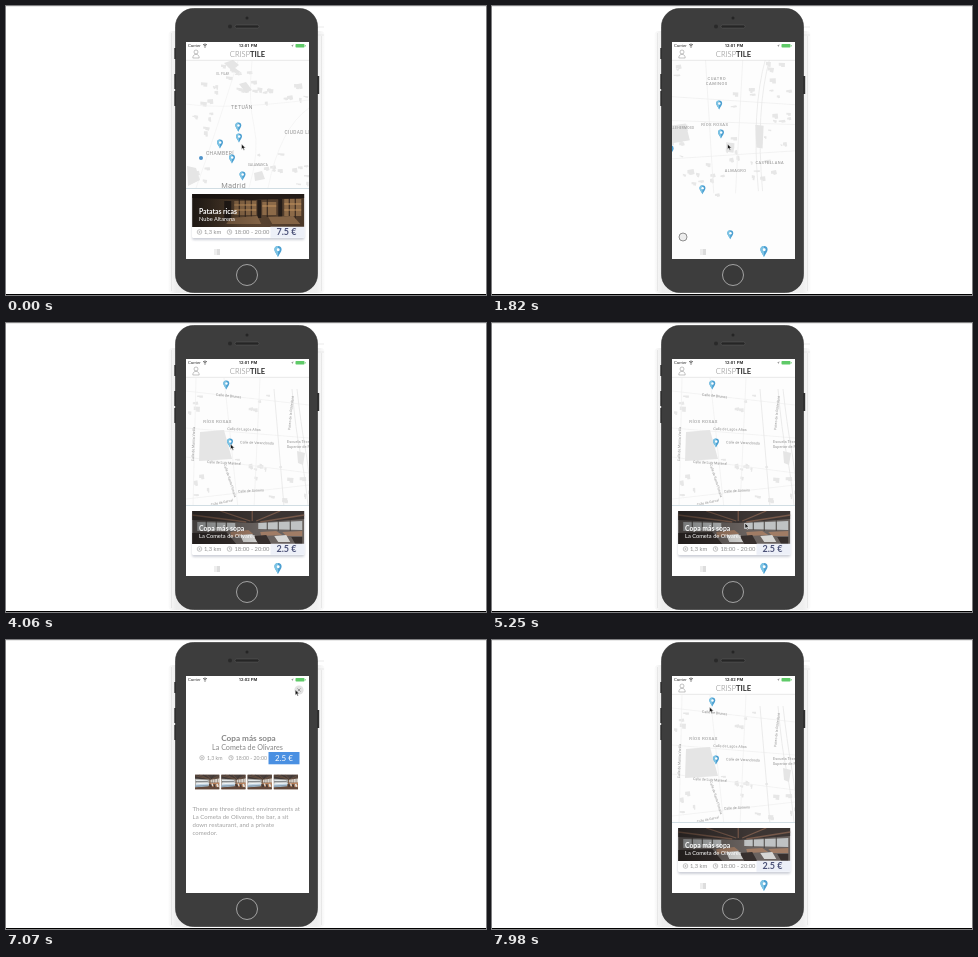
These frames come from a looping animation (480 by 289 pixels, 8 s). An HTML page:

```html
<!DOCTYPE html>
<html lang="en">
<head>
<meta charset="utf-8">
<title>Map app demo</title>
<style>
html, body { margin: 0; width: 100%; height: 100%; overflow: hidden; background: #fff; }
svg.stage { display: block; width: 100vw; height: 100vh; }
text { font-family: Lato, "Open Sans", sans-serif; }
.map text { font-family: Roboto, "Noto Sans", sans-serif; text-anchor: middle; fill: #8f8f8f; }
.sys text { font-family: Roboto, sans-serif; font-size: 4.3px; fill: #333; }
.mid { text-anchor: middle; }
.line { fill: none; stroke: #9a9a9a; stroke-width: .6; }
</style>
</head>
<body>
<svg class="stage" viewBox="0 0 480 289" preserveAspectRatio="none">
  <defs>
    <clipPath id="screen"><path d="M180 36h123v217H180z"/></clipPath>
    <clipPath id="heroClip"><rect id="heroRect" x="180" y="36" width="123" height="72"/></clipPath>
    <linearGradient id="halo">
      <stop offset="0" stop-color="#fafafa"/><stop offset=".05" stop-color="#e6e6e6"/>
      <stop offset=".95" stop-color="#e9e9e9"/><stop offset="1" stop-color="#fafafa"/>
    </linearGradient>
    <linearGradient id="warm">
      <stop offset="0" stop-color="#302720"/><stop offset=".45" stop-color="#5d4631"/>
      <stop offset="1" stop-color="#4b3829"/>
    </linearGradient>
    <linearGradient id="shade">
      <stop offset="0" stop-color="#000" stop-opacity=".4"/><stop offset="1" stop-color="#000" stop-opacity="0"/>
    </linearGradient>
    <filter id="soft" x="-20%" y="-20%" width="140%" height="140%"><feGaussianBlur stdDeviation="1.2"/></filter>
    <filter id="tiny"><feGaussianBlur stdDeviation=".35"/></filter>

    <symbol id="bar" viewBox="0 0 123 72">
      <path fill="#7d604b" d="M0 0h123v72H0z"/>
      <path fill="#493f3b" d="M0 0h123v17L78 25 0 22z"/>
      <path stroke="#8d6549" stroke-width="2" d="M0 4l70 18M20 0l56 22M58 0l22 22M123 2L82 23M123 12L84 24"/>
      <path stroke="#2b2726" stroke-width="1.4" d="M0 11l66 12M40 0l36 22M95 0L80 22"/>
      <path fill="#a9a9a7" d="M0 20l72 4v16L0 44z"/>
      <path fill="#e3e8ea" d="M4 25l60 2v4L4 31zM8 34l55-1v4L8 39z"/>
      <path fill="#4d5259" d="M4 31h60v2L4 34z"/>
      <path fill="#c3d4e2" d="M3 44l62-4 7 3-6 16L0 63z"/>
      <path fill="#f0f4f6" d="M3 42l64-3 5 4-69 4z"/>
      <path fill="#8ca3b6" d="M0 54l68-4-2 7-66 5z"/>
      <path fill="#d8d2ca" d="M78 25l45-7v22l-45-1z"/>
      <path stroke="#5a4a42" stroke-width="2" d="M87 23v18M99 21v21M113 18v26"/>
      <path fill="#b9815b" d="M74 42l49-4v8l-43 3zM84 53l39-4v9l-36 3z"/>
      <path fill="#493b36" d="M70 46l12 2 3 15-12-2zM92 49l9-1 3 16-9 2z"/>
      <path fill="#dfdcd7" d="M82 44l7-1 3 12-6 2zM106 46l9-1 5 15-9 1z"/>
      <path fill="#62473a" d="M0 63l65-4 58 4v9H0z"/>
    </symbol>
    <symbol id="photo1" viewBox="0 0 112 33">
      <path fill="url(#warm)" d="M0 0h112v33H0z"/>
      <g filter="url(#tiny)">
        <path fill="#8c6a48" d="M42 7h22v14H42zM70 8h14v13H70zM92 5h17v17H92z"/>
        <path stroke="#2d211a" d="M47 5v18M53 5v18M59 5v18M75 5v18M97 3v22M103 3v22"/>
        <path stroke="#c99860" stroke-width=".9" d="M42 11h22M42 16h22M70 12h14M92 10h17M92 16h17"/>
        <path fill="#241c18" d="M0 0h112v4L60 6 0 4zM32 7h7v19h-7zM65 6h4v18h-4zM86 4h4v21h-4z"/>
        <path fill="#846446" d="M38 24l27-2 4 8H34zM76 23l25-1 7 8H80z"/>
      </g>
      <path fill="url(#shade)" d="M0 0h70v33H0z"/>
    </symbol>
    <symbol id="photo2" viewBox="0 0 112 33">
      <path fill="#6a6360" d="M0 0h112v33H0z"/>
      <path fill="#3c3533" d="M0 0h112v8L60 12 0 9z"/>
      <path stroke="#76594a" stroke-width="1.3" d="M0 4l54 7M28 0l30 10M60 0v10M88 0L64 10M112 4L68 11"/>
      <path fill="#bfc2c3" d="M5 11l38 1v7L5 20zM66 12l44-2v9l-44-1z"/>
      <path stroke="#4a4543" d="M14 10v10M24 10v10M34 11v9M75 11v8M86 10v10M98 9v11"/>
      <path fill="#a07c65" d="M38 21l18-2 5 4-22 3zM68 21l16-1 6 4-21 1zM90 21l20-1v5H94z"/>
      <path fill="#d6d6d4" d="M48 24l12-1 5 8H51zM82 25l12-1 4 7H86z"/>
      <path fill="#37302e" d="M0 22l34-1 10 12H0zM62 25l12-1 5 9H66zM99 26h11v7h-7z"/>
      <path fill="url(#shade)" d="M0 0h70v33H0z"/>
    </symbol>
    <g id="pin">
      <path fill="#4b9fd1" d="M0 4.6C-1 2.2-3 .2-3-1.5a3 3 0 0 1 6 0C3 .2 1 2.2 0 4.6z"/>
      <path fill="#7cc3e4" d="M0 4.6C-1 2.2-3 .2-3-1.5a3 3 0 0 1 3-3z"/>
      <circle cx=".2" cy="-1.5" r="1.2" fill="#fff"/>
    </g>
    <g id="facts">
      <g class="line">
        <circle cx="193.500" cy="226" r="2.300"/><circle cx="193.500" cy="226" r=".6"/>
        <circle cx="223.500" cy="226" r="2.300"/><path d="M223.500 224.500v1.700h1.200"/>
      </g>
      <g fill="#8d8d8d" font-size="5.800"><text x="198" y="228">1,3 km</text><text x="228.500" y="228">18:00 - 20:00</text></g>
    </g>
  </defs>

  <path fill="#fff" d="M0 0h480v289H0z"/>
  <path fill="#d4d4d4" d="M0 0h480v.6H0z"/>
  <rect x="162.500" y="25" width="156" height="262" rx="4" fill="url(#halo)" opacity=".75"/>
  <path fill="none" stroke="#ddd" stroke-width=".6" d="M304 21h14M304 29h14M165.500 27v258M315.500 30v255"/>
  <path fill="#303030" d="M168.300 42h2v11h-2zM168.300 68h2v15h-2zM168.300 85h2v15h-2zM311 70h2.200v18H311z"/>
  <rect x="169.500" y="2.500" width="142" height="284" rx="18" fill="#3d3d3d" stroke="#2d2d2d" stroke-width=".6"/>
  <circle cx="241" cy="12" r="1.500" fill="#252525"/>
  <circle cx="224" cy="20.500" r="2" fill="#292929"/>
  <rect x="229" y="19" width="24" height="3" rx="1.500" fill="#252525" stroke="#666" stroke-width=".4"/>
  <circle cx="241" cy="269" r="10.500" fill="#393939" stroke="#bdbdbd" stroke-width=".8"/>

  <g clip-path="url(#screen)">
    <path fill="#fdfdfd" d="M180 36h123v217H180z"/>
    <g id="map" class="map"></g>
    <g id="pins"></g>
    <circle cx="191" cy="231" r="4" fill="#ededed" stroke="#666" stroke-width=".7"/>

    <g id="panel">
      <path fill="#fff" d="M180 182h123v72H180z"/>
      <path stroke="#c6d5dc" stroke-width=".8" d="M180 182.500h123"/>
      <rect x="186" y="190" width="112.500" height="44" rx="2" fill="#b4b8c4" opacity=".65" filter="url(#soft)"/>
      <rect x="186" y="188" width="112.500" height="44" rx="1.500" fill="#fff"/>
      <use id="photoA" href="#photo1" x="186" y="188" width="112.500" height="33"/>
      <use id="photoB" href="#photo2" x="186" y="188" width="112.500" height="33"/>
      <text id="dish" x="193" y="207.600" font-size="6.800" font-weight="700" fill="#fff"></text>
      <text id="place" x="193" y="214.800" font-size="5.700" fill="#fff"></text>
      <use href="#facts"/>
      <path fill="#edf0f8" d="M264.500 220.800h34v11h-34z"/>
      <text id="price" class="mid" x="280.500" y="229.400" font-size="9" font-weight="700" fill="#4c5278"></text>
    </g>
    <path stroke="#aaa" stroke-width=".8" d="M208.500 244h1M210.500 244h3.500M208.500 246h1M210.500 246h3.500M208.500 248h1M210.500 248h3.500"/>
    <use href="#pin" transform="translate(272 245.500) scale(1.200)"/>

    <path fill="#fff" d="M180 36h123v18H180z"/>
    <path stroke="#d9d9d9" stroke-width=".6" d="M180 54.300h123"/>
    <g class="line" stroke-width=".8"><circle cx="190" cy="46" r="2"/><path d="M186.800 52c0-5 6.400-5 6.400 0z"/></g>
    <text class="mid" x="241.500" y="51.200" font-size="7.600" fill="#777"><tspan font-weight="300">CRISP</tspan><tspan font-weight="700" fill="#333">TILE</tspan></text>

    <g id="detail">
      <path id="page" fill="#fff" d="M180 36h123v217H180z"/>
    </g>
    <g class="sys">
      <text x="182" y="41.400">Carrier</text>
      <path d="M197 38.800q2-1.600 4 0M197.900 39.900q1.100-.8 2.200 0" fill="none" stroke="#333" stroke-width=".7"/>
      <circle cx="199" cy="41" r=".5"/>
      <text id="clock" class="mid" x="242" y="41.400" font-weight="700"></text>
    </g>
    <g id="hero">
      <use id="heroPic" href="#bar" x="180" y="36" width="123" height="72" preserveAspectRatio="none" clip-path="url(#heroClip)"/>
      <g id="heroNav">
        <text class="mid" x="241.500" y="54" font-size="7.600" fill="#fff"><tspan font-weight="300">CRISP</tspan><tspan font-weight="700">TILE</tspan></text>
        <circle cx="293" cy="50" r="4.600" fill="#d8d8d8" opacity=".75"/>
        <path stroke="#777" stroke-width=".7" d="M291.500 48.500l3 3M294.500 48.500l-3 3"/>
      </g>
    </g>
    <g id="sheet">
      <path fill="#fff" d="M180 107.500h9.500V87h104v20.500h9.500V253H180z"/>
      <text class="mid" x="242.500" y="100.800" font-size="8.200" font-weight="700" fill="#858585">Copa más sopa</text>
      <text class="mid" x="241.500" y="110" font-size="7.200" fill="#858585">La Cometa de Olivares</text>
      <g class="line">
        <circle cx="196" cy="117.800" r="2.200"/><circle cx="196" cy="117.800" r=".6"/>
        <circle cx="225" cy="117.800" r="2.200"/><path d="M225 116.400v1.600h1.200"/>
      </g>
      <g fill="#999" font-size="5.200"><text x="201" y="119.700">1,3 km</text><text x="229.700" y="119.700">18:00 - 20:00</text></g>
      <path fill="#4a90e2" d="M262.500 112h31v12.300h-31z"/>
      <text class="mid" x="278" y="120.900" font-size="8" fill="#fff">2.5 €</text>
      <g id="thumbs"></g>
      <g fill="#a0a0a0" font-size="6" letter-spacing=".05">
        <text x="186.500" y="170.700">There are three distinct environments at</text>
        <text x="186.500" y="178.800">La Cometa de Olivares, the bar, a sit</text>
        <text x="186.500" y="186.900">down restaurant, and a private</text>
        <text x="186.500" y="195">comedor.</text>
      </g>
    </g>
    <path fill="#999" d="M285 39.800l2.600-1.500-1 2.900-.4-1.200z"/>
    <rect x="289.500" y="38" width="9" height="3.400" rx=".7" fill="#5fca68"/>
    <path fill="#8ad38f" d="M299 39h.8v1.400h-.8z"/>
  </g>

  <path id="cursor" d="M0 0V5.400L1.300 4.200 2.200 6.300 3.200 5.900 2.300 3.900H4z" fill="#111" stroke="#fff" stroke-width=".5"/>
  <path fill="#000" d="M0 288h480v1H0z"/>
</svg>

<script>
const LOOP = 8000, STEP = 70;
const $ = id => document.getElementById(id);

function add(parent, tag, attrs, text) {
  const el = document.createElementNS("http://www.w3.org/2000/svg", tag);
  for (const k in attrs) el.setAttribute(k, attrs[k]);
  if (text) el.textContent = text;
  parent.append(el);
  return el;
}

function rng(seed) {
  return () => (seed = (seed * 16807) % 2147483647) / 2147483647;
}

// Small tilted buildings gathered around each centre.
function scatter(g, seed, centres, n, spread, size) {
  const rnd = rng(seed);
  let d = "";
  for (const [cx, cy] of centres) for (let i = 0; i < n; i++) {
    const x = cx + (rnd() - .5) * spread, y = cy + (rnd() - .5) * spread;
    const w = size * (.4 + rnd()), h = size * (.3 + rnd() * .8), k = (rnd() - .5) * 2;
    d += `M${x} ${y}l${w} ${k}l${-k} ${h}l${-w * .6} ${-k}l${k} ${-h * .3}l${-w * .4} 0z`;
  }
  add(g, "path", { d, fill: "#e7e7e7" });
}

const label = (g, x, y, text, size = 3.6, turn = 0, gap = 0) =>
  add(g, "text", { x, y, "font-size": size, "letter-spacing": gap, transform: `rotate(${turn} ${x} ${y})` }, text);
const roads = (g, d, width = 1, stroke = "#e6e6e6") =>
  add(g, "path", { d, fill: "none", stroke, "stroke-width": width });
const area = (g, d) => add(g, "path", { d, fill: "#e5e5e5" });

const layers = [
  { scale: 1, x: 233, y: 132 },
  { scale: 2.55, x: 229, y: 128 },
  { scale: 5.3, x: 224, y: 120 },
  { scale: 5.3, x: 224, y: 120 }
];
for (const l of layers) l.g = add($("map"), "g", {});
const [city, zone, district, streets] = layers.map(l => l.g);

scatter(city, 71, [[226, 62], [238, 74], [287, 83], [196, 115], [188, 166], [262, 153], [291, 168], [252, 88], [205, 86]], 6, 22, 5);
roads(city, "M246 55q-4 40 2 65t-5 62M180 98q40 6 123-4M190 182q18-50 42-127M262 182q12-60 41-80", .6, "#f0f0f0");
area(city, "M218 57l9-3 6 5-4 3 7 5-8-1-5-4zM233 78l7-2 6 8-6 3zM181 160l9 2 4 12-12 6zM248 167l8-2 3 8-10 2z");
label(city, 236, 102.5, "TETUÁN", 5, 0, .5);
label(city, 214, 148.700, "CHAMBERÍ", 5, 0, .4);
label(city, 298, 127.500, "CIUDAD LINEAL", 4.8, 0, .4);
label(city, 252, 160, "SALAMANCA", 3, 0, .2);
label(city, 217, 69, "EL PILAR", 2.8, 0, .2);
label(city, 227.500, 182, "Madrid", 7.5, 0, .2);

scatter(zone, 29, [[190, 66], [284, 64], [194, 130], [236, 138], [282, 124], [268, 158], [200, 160], [250, 92], [290, 100], [215, 172]], 6, 30, 4.5);
roads(zone, "M180 92l123 8M180 152l123-8M214 55l8 130M250 55l-7 130M180 115l123 4", .7, "#efefef");
roads(zone, "M272 55q-14 50-7 128M276 55q-14 50-7 128", .7);
area(zone, "M181 120l14-2 4 16-17 3zM262 119l8 1-1 22-6-1zM234 136l8 1-1 9-7-1z");
label(zone, 225, 75.800, "CUATRO", 4, 0, .5);
label(zone, 225, 80.600, "CAMINOS", 4, 0, .5);
label(zone, 223, 120, "RÍOS ROSAS", 4, 0, .4);
label(zone, 243, 164.500, "ALMAGRO", 3.8, 0, .4);
label(zone, 276, 156.500, "CASTELLANA", 3.8, 0, .4);
label(zone, 190, 123, "VALLEHERMOSO", 3.2, 0, .2);

scatter(district, 53, [[245, 150], [280, 205], [196, 172], [212, 196], [270, 65], [190, 78], [248, 84], [284, 152], [292, 226], [232, 226]], 4, 30, 6);
roads(district, "M180 66l123 14M180 96l110 12M180 142l123 11M180 176l123-10M217 55l10 198M243 55l-5 198M187 55l-2 198", .7, "#f0f0f0");
roads(district, "M272 55q7 40 14 62t17 63M279 55q3 38 11 60t13 42", .8);
roads(district, "M274 90l14 42 4-30M270 98l18-2M284 55l6 62", .6, "#dedede");
area(district, "M189 110l24-2 4 31h-28zM276 96l7-1 2 9-8 1z");
label(district, 221, 74, "Calle de Brunes", 3.5, 6);
label(district, 241, 91, "Calle de Ramiro Soto", 3.3, -84);
label(district, 252, 96, "Calle de Benito Lasierra", 3.3, -82);
label(district, 188, 142, "Calle de Mansa Varilla", 3.5, -89);
label(district, 258, 144, "Calle de Luis Maranal", 3.6, 4);
label(district, 226, 169, "Calle de Santa Floriana", 3.4, 72);
label(district, 211.500, 100, "RÍOS ROSAS", 4.4, 0, .4);
label(district, 255.500, 188, "ALMAGRO", 4.4, 0, .4);
label(district, 188, 206.700, "TRAFALGAR", 4.4, 0, .4);

scatter(streets, 97, [[194, 82], [252, 75], [262, 148], [292, 160], [198, 160], [272, 175], [240, 142]], 4, 24, 5);
roads(streets, "M180 68l123 14M180 105l123 10M180 134l123 16M180 176l123-14M218 55l14 130M254 55l-6 130M190 55l-3 130", .7, "#f0f0f0");
roads(streets, "M286 66q4 44 8 62t8 54M291 66q4 36 8 58t4 34M268 66l10 118", .8);
area(streets, "M194 109l24-2 8 29-33 2zM291 128l8 2-2 12-5-2z");
label(streets, 222.500, 74, "Calle de Brunes", 3.7, 6);
label(streets, 211.500, 100, "RÍOS ROSAS", 4.4, 0, .4);
label(streets, 238, 107.500, "Calle de Lagos Altos", 3.7, 2);
label(streets, 251, 121, "Calle de Verandonda", 3.7, 2);
label(streets, 218, 141, "Calle de Luis Maranal", 3.6, 3);
label(streets, 245, 169, "Calle de Solmiro", 3.6, -3);
label(streets, 216, 180.500, "Calle de Garcal", 3.4, -12);
label(streets, 188.500, 121, "Calle de Mansa Varilla", 3.5, -88);
label(streets, 223, 158, "Calle de Santa Floriana", 3.4, 72);
label(streets, 286, 90, "Paseo de la Robledana", 3.4, -84);
label(streets, 295, 119.500, "Escuela Técnica", 3.9);
label(streets, 297, 124.500, "Superior de Policía", 3.9);

// Offsets from the anchor pin at city scale.
const pins = [[3.5, 38], [-7, 21], [-19, 6], [-.7, -10.95], [0, 0]]
  .map(([x, y]) => ({ x, y, el: add($("pins"), "use", { href: "#pin" }) }));
const dot = { x: -38, y: 20, el: add($("pins"), "circle", { r: 2, fill: "#4f93c9" }) };

for (let i = 0; i < 4; i++) add($("thumbs"), "use", {
  href: "#bar", x: 189 + i * 26.2, y: 130, width: 24.5, height: 24, preserveAspectRatio: "none"
});

// Rows are [time, ...values].
const VIEW = [[70, 1, 233, 132], [840, 2.55, 229, 128], [910, 2.55, 229, 128], [1260, 2.65, 229, 128],
  [1820, 2.65, 229, 128], [2100, 5.3, 224, 120]];
const FADES = [
  [[420, 1], [770, 0]],
  [[350, 0], [700, 1], [1820, 1], [2100, 0]],
  [[1820, 0], [2030, 1], [2940, 1], [3150, 0]],
  [[2870, 0], [3080, 1]]
];
const HIDE = [[910, 0], [1260, 1], [3710, 1], [3920, 0]];
const CURSOR = [[2240, 235.5, 138], [2520, 228, 126], [2800, 224.5, 121], [4130, 224.5, 121],
  [4900, 253, 200], [5600, 253, 200], [5950, 262, 141], [6790, 291, 48], [6930, 291, 48],
  [7560, 277, 62], [7700, 277, 62], [7980, 217.5, 67]];

function at(rows, t) {
  const i = rows.findIndex(r => r[0] > t);
  if (i === 0) return rows[0].slice(1);
  if (i < 0) return rows[rows.length - 1].slice(1);
  const a = rows[i - 1], b = rows[i], p = (t - a[0]) / (b[0] - a[0]), e = p * p * (3 - 2 * p);
  return a.slice(1).map((v, k) => v + (b[k + 1] - v) * e);
}

const spring = (ms, w) => ms <= 0 ? 1 : (1 + w * ms / 1000) * Math.exp(-w * ms / 1000);
const move = (el, x, y) => el.setAttribute("transform", `translate(${x} ${y})`);
const show = (el, on) => el.setAttribute("visibility", on ? "visible" : "hidden");

function drawMap(t) {
  const [s, x, y] = at(VIEW, t);
  layers.forEach((l, i) => {
    const [o] = at(FADES[i], t);
    show(l.g, o > 0);
    l.g.setAttribute("opacity", o);
    l.g.setAttribute("transform", `translate(${x} ${y}) scale(${s / l.scale}) translate(${-l.x} ${-l.y})`);
  });
  for (const p of [...pins, dot]) move(p.el, x + p.x * s, y + p.y * s);
}

function drawCard(t) {
  const first = t < 2000;
  move($("panel"), 0, at(HIDE, t)[0] * 72);
  show($("photoA"), first);
  show($("photoB"), !first);
  $("dish").textContent = first ? "Patatas ricas" : "Copa más sopa";
  $("place").textContent = first ? "Nube Altarena" : "La Cometa de Olivares";
  $("price").textContent = first ? "7.5 €" : "2.5 €";
}

function drawDetail(t) {
  const on = t >= 5180 && t < 7630;
  for (const id of ["detail", "hero", "sheet"]) show($(id), on);
  if (!on) return;
  // 1 = resting in the card, 0 = fully open
  const r = t < 6500 ? spring(t - 5180, 14.6) : 1 - spring(t - 7070, 13);
  const box = { x: 180 + 6 * r, y: 36 + 152 * r, width: 123 - 10.5 * r, height: 72 - 39 * r };
  for (const k in box) {
    $("heroRect").setAttribute(k, box[k]);
    $("heroPic").setAttribute(k, box[k]);
  }
  move($("heroNav"), 0, box.y - 36);
  const o = Math.max(0, Math.min(1, 1.3 - 2 * r));
  $("page").setAttribute("opacity", o);
  $("sheet").setAttribute("opacity", o);
  $("heroNav").setAttribute("opacity", o);
  $("hero").setAttribute("opacity", Math.min(1, (1 - r) * 5));
}

function frame() {
  const t = Math.floor(performance.now() % LOOP / STEP) * STEP;
  drawMap(t);
  drawCard(t);
  drawDetail(t);
  $("clock").textContent = t < 6500 ? "12:01 PM" : "12:02 PM";
  move($("cursor"), ...at(CURSOR, t));
  requestAnimationFrame(frame);
}
frame();
</script>
</body>
</html>
```
